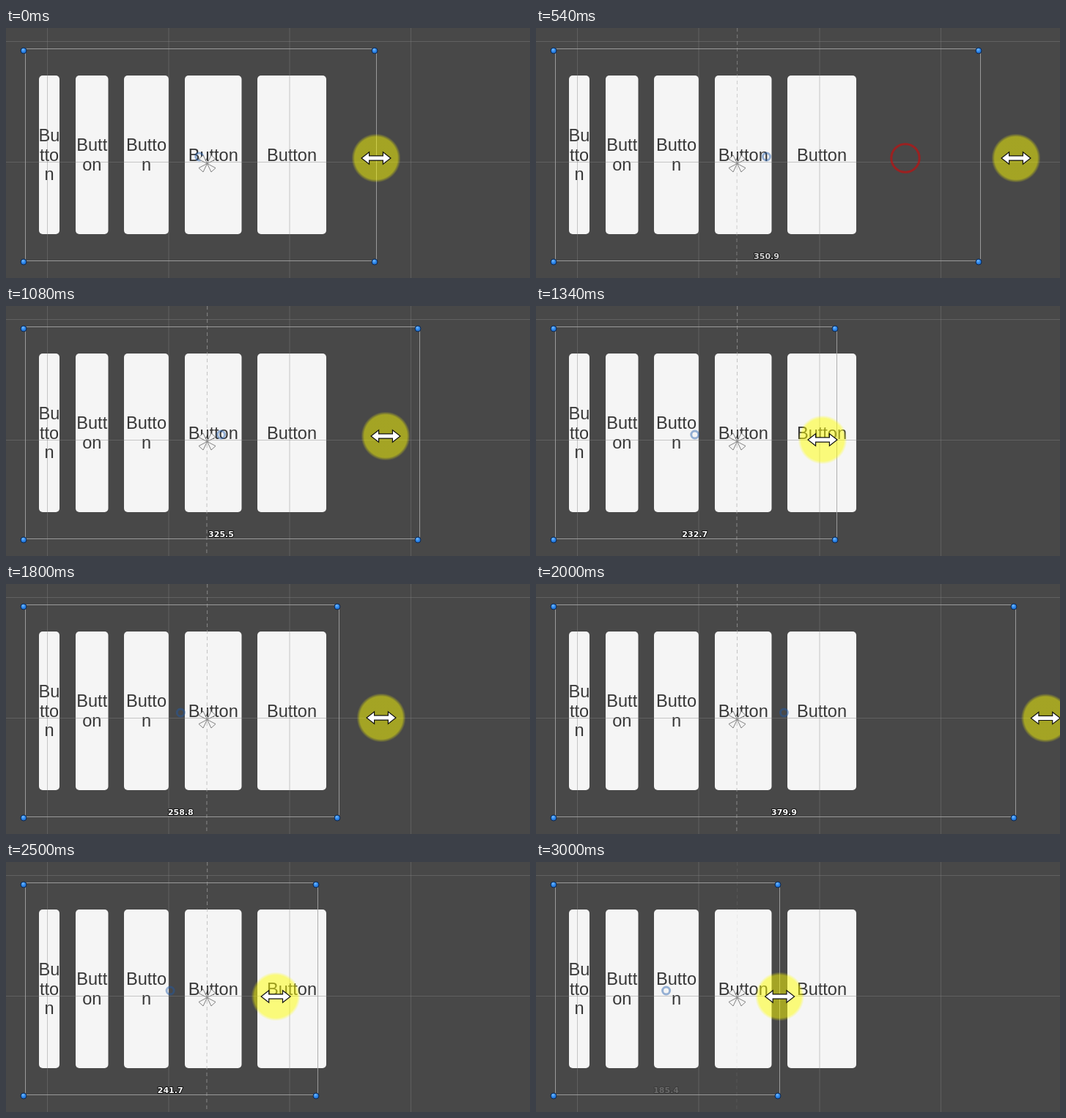
An HTML page with a canvas for the animation above (3020 ms loop, 715 px wide and 342 px high).

```html
<!DOCTYPE html>
<html lang="en">
<head>
<meta charset="utf-8">
<title>Resize handle</title>
<style>
html, body { margin: 0; width: 100%; height: 100%; overflow: hidden; background: #484848; }
canvas { display: block; }
</style>
</head>
<body>
<canvas id="stage" width="715" height="342"></canvas>
<script>
const g = document.getElementById('stage').getContext('2d');
const LOOP = 3020, LAG = 55, LEFT = 26, UNIT = 1.654;

// Pointer path: time in ms, x in px
const path = [
  [275, 505], [485, 606.4], [540, 655], [685, 705], [820, 705],
  [1025, 564.4], [1080, 518], [1285, 410.9], [1340, 391], [1470, 372],
  [1745, 454], [1800, 512], [1900, 616], [2060, 715], [2165, 696.7],
  [2220, 642], [2365, 502], [2420, 450], [2565, 332.6]
];
const buttons = [
  [45, 28, ['Bu', 'tto', 'n']],
  [95, 44.5, ['Butt', 'on']],
  [161, 61, ['Butto', 'n']],
  [244, 77.5, ['Button']],
  [343, 94, ['Button']]
];

const clamp = v => Math.max(0, Math.min(1, v));
const rate = (a, b) => (b[1] - a[1]) / (b[0] - a[0]);

function slope(i) {
  if (i === 0 || i === path.length - 1) return 0;
  const before = rate(path[i - 1], path[i]), after = rate(path[i], path[i + 1]);
  return before * after <= 0 ? 0 : (before + after) / 2;
}

function pointerX(t) {
  const last = path.length - 1;
  if (t <= path[0][0]) return path[0][1];
  if (t >= path[last][0]) return path[last][1];
  const i = path.findIndex(p => p[0] > t) - 1;
  const [t0, x0] = path[i], [t1, x1] = path[i + 1];
  const d = t1 - t0, u = (t - t0) / d, v = 1 - u;
  return x0 * v * v * (1 + 2 * u) + x1 * u * u * (3 - 2 * u)
    + d * u * v * (slope(i) * v - slope(i + 1) * u);
}

function line(x0, y0, x1, y1) {
  g.beginPath();
  g.moveTo(x0, y0);
  g.lineTo(x1, y1);
  g.stroke();
}

function disc(x, y, r) {
  g.beginPath();
  g.arc(x, y, r, 0, 2 * Math.PI);
}

function drawButtons() {
  g.font = '23.6px "Liberation Sans", Arial, sans-serif';
  g.textAlign = 'center';
  for (const [x, w, rows] of buttons) {
    g.fillStyle = '#f5f5f5';
    g.beginPath();
    g.roundRect(x, 65, w, 217, 5);
    g.fill();
    g.fillStyle = '#383838';
    rows.forEach((row, i) =>
      g.fillText(row, x + w / 2, 181.7 + (i - (rows.length - 1) / 2) * 26.6));
  }
}

function drawGrid() {
  g.lineWidth = 1;
  g.strokeStyle = 'rgba(128,128,128,.42)';
  for (const x of [56.5, 222, 387, 552.5]) line(x, 0, x, 342);
  for (const y of [18.5, 183.5]) line(0, y, 715, y);
}

function drawHandle(x, y) {
  const fill = g.createRadialGradient(x - 1, y - 2, 0, x, y, 4.5);
  fill.addColorStop(0, '#7cc0ff');
  fill.addColorStop(.55, '#2d86ea');
  fill.addColorStop(1, '#1560c0');
  disc(x, y, 4);
  g.fillStyle = fill;
  g.fill();
  g.lineWidth = 1;
  g.strokeStyle = '#10294d';
  g.stroke();
}

function drawFrame(right) {
  const x = Math.floor(right) + .5;
  g.lineWidth = 1;
  g.strokeStyle = 'rgba(165,165,165,.88)';
  g.strokeRect(LEFT + .5, 28.5, x - LEFT - .5, 290);
  for (const hx of [24, x - 2.5])
    for (const hy of [31, 320]) drawHandle(hx, hy);
}

function drawPivot(x) {
  disc(x, 176, 5);
  g.lineWidth = 3;
  g.strokeStyle = 'rgba(30,90,170,.45)';
  g.stroke();
}

function drawAnchor() {
  g.lineWidth = 1;
  g.lineJoin = 'round';
  g.fillStyle = '#f4f4f4';
  g.strokeStyle = 'rgba(110,110,110,.85)';
  for (const sx of [-1, 1]) {
    for (const sy of [-1, 1]) {
      g.beginPath();
      g.moveTo(274.5, 185.5);
      g.lineTo(274.5 + sx * 5.5, 185.5 + sy * 11.5);
      g.lineTo(274.5 + sx * 11.5, 185.5 + sy * 6);
      g.closePath();
      g.fill();
      g.stroke();
    }
  }
}

function drawMeasure(right, mid, alpha) {
  if (alpha <= 0) return;
  g.globalAlpha = alpha;
  g.lineWidth = 1;
  g.strokeStyle = 'rgba(170,170,170,.65)';
  g.setLineDash([5, 4]);
  line(274.7, 0, 273.9, 342);
  g.setLineDash([]);
  const text = ((right - LEFT) / UNIT).toFixed(1);
  g.font = 'bold 11px "DejaVu Sans", Verdana, sans-serif';
  g.textAlign = 'center';
  g.lineWidth = 2;
  g.strokeStyle = 'rgba(0,0,0,.8)';
  g.strokeText(text, mid, 316);
  g.fillStyle = '#fff';
  g.fillText(text, mid, 316);
  g.globalAlpha = 1;
}

function drawClick(t) {
  const p = (t - 300) / 400;
  if (p <= 0 || p >= 1) return;
  g.globalAlpha = 1 - p * p;
  disc(504, 178, 32 * p);
  g.lineWidth = 3;
  g.strokeStyle = '#c80c0c';
  g.stroke();
  g.globalAlpha = 1;
}

function drawPointer(x, y) {
  const glow = g.createRadialGradient(x, y, 0, x, y, 33.5);
  glow.addColorStop(0, 'rgba(255,255,0,.5)');
  glow.addColorStop(.87, 'rgba(255,255,0,.5)');
  glow.addColorStop(1, 'rgba(255,255,0,0)');
  g.fillStyle = glow;
  disc(x, y, 34);
  g.fill();

  g.beginPath();
  for (const s of [1, -1]) {
    for (const [px, py] of [[-10, -2.5], [-10, -7], [-19, 0], [-10, 7], [-10, 2.5]])
      g.lineTo(x + s * px, y - s * py);
  }
  g.closePath();
  g.lineJoin = 'miter';
  g.lineWidth = 2.4;
  g.strokeStyle = '#111';
  g.stroke();
  g.fillStyle = '#fff';
  g.fill();
}

function draw(t) {
  const right = pointerX(t - LAG);
  const mid = (LEFT + right) / 2 - 1.7;
  const shown = Math.min(clamp((t - 280) / 320), clamp(1 - (t - 2820) / 235));
  const y = 178 + 5 * clamp((t - 1080) / 240) + clamp((t - 1900) / 240);

  g.fillStyle = '#484848';
  g.fillRect(0, 0, 715, 342);
  drawButtons();
  drawGrid();
  drawFrame(right);
  drawPivot(mid);
  drawAnchor();
  drawMeasure(right, mid, shown);
  drawClick(t);
  drawPointer(pointerX(t), y);
}

const start = performance.now();
function tick() {
  const t = (performance.now() - start) % LOOP;
  draw(Math.floor(t / 20) * 20);
  requestAnimationFrame(tick);
}
tick();
</script>
</body>
</html>
```
